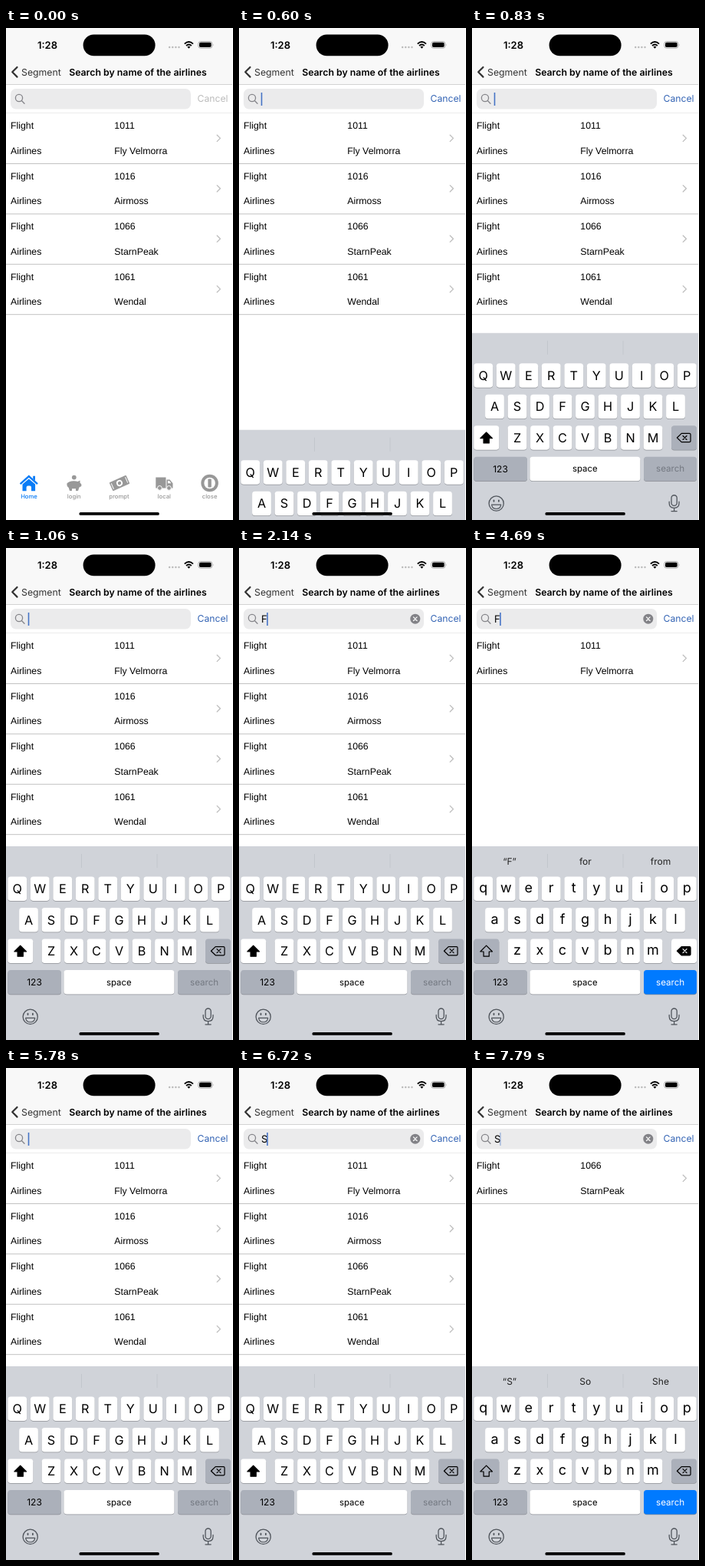
These frames come from a looping animation (296 by 640 pixels, 8 s). An HTML page:

```html
<!DOCTYPE html>
<html lang="en">
<head>
<meta charset="utf-8">
<title>Airline search</title>
<style>
  html, body { margin: 0; width: 100%; height: 100%; overflow: hidden; background: #fff; }
  svg { display: block; font: 12.2px Inter, sans-serif; text-rendering: geometricPrecision; }
  .mid { text-anchor: middle; }
  .row { font: 12.3px "Liberation Sans", Arial, sans-serif; }
  .line { fill: none; stroke-linecap: round; stroke-linejoin: round; }
  .tab text { font-size: 7.7px; font-weight: 500; text-anchor: middle; stroke: none; }
</style>
</head>
<body>
<svg width="295" height="640" viewBox="0 0 295 640">
  <rect width="295" height="73" fill="#f8f8f8"/>
  <path d="M0 73.5H295" stroke="#d2d2d2"/>
  <path d="M0 110.5H295" stroke="#ececec"/>

  <text x="54" y="26.5" class="mid" font-size="13" font-weight="600">1:28</text>
  <rect x="100.6" y="8.4" width="94" height="27.8" rx="13.9"/>
  <path d="M213.2 25H226" stroke="#b9b9b9" stroke-width="2.4" stroke-linecap="round" stroke-dasharray="0 4.1"/>
  <path d="M232.8 20.6Q238.4 15.6 244 20.6M235 23Q238.4 20 241.8 23" fill="none" stroke="#000" stroke-width="1.9"/>
  <path d="M236.4 24.6Q238.4 23 240.4 24.6L238.4 26.8Z"/>
  <rect x="250.8" y="17.6" width="18" height="8.6" rx="2.8" fill="none" stroke="#999" stroke-width=".8"/>
  <rect x="252" y="18.8" width="15.6" height="6.2" rx="1.7"/>
  <path d="M269.8 20.4q1.4 1.5 0 3z" fill="#999"/>

  <path class="line" d="M14.5 51L8.2 57.3L14.5 63.6" stroke="#333" stroke-width="2.2"/>
  <text x="20" y="61.7" font-size="12.3" fill="#333">Segment</text>
  <text x="172" y="61.7" class="mid" font-size="12.3" font-weight="600">Search by name of the airlines</text>

  <rect x="6" y="79" width="235" height="26.5" rx="7" fill="#ebebec"/>
  <g class="line" stroke="#85858a" stroke-width="1.3">
    <circle cx="17" cy="91" r="4.6"/><path d="M20.4 94.5L24 98.2"/>
  </g>
  <text id="query" x="29" y="96.8" font-size="13"></text>
  <rect id="caret" y="84" width="1.6" height="17" fill="#4673c5"/>
  <g id="clear">
    <circle cx="229.8" cy="92.2" r="6.5" fill="#828287"/>
    <path class="line" d="M227.5 89.9l4.6 4.6m0-4.6l-4.6 4.6" stroke="#fff" stroke-width="1.2"/>
  </g>
  <text id="cancel" x="249.6" y="96.2">Cancel</text>

  <g id="list"></g>

  <g class="tab" fill="#989898">
    <g fill="#0a7cf6">
      <path d="M17.8 592.2L29.8 581.5L41.8 592.2L40.2 594L29.8 584.8L19.4 594Z"/>
      <path d="M35.2 582.8H38V589L35.2 586.4Z"/>
      <path d="M21.5 593.6L29.8 586.4L38.1 593.6V602.3H33V597.5Q33 595.5 31 595.5H28.6Q26.6 595.5 26.6 597.5V602.3H21.5Z"/>
      <text x="30" y="611.5" font-weight="700">Home</text>
    </g>
    <circle cx="88.8" cy="584.6" r="2.9"/>
    <path d="M79.3 592.8Q82 589 88.8 589.2Q92 589.2 93.5 590L96.5 588.6V591.4L98.3 593.5V596L95.5 597.4L94 602H91V599.2H86V602H83L81.7 598Q79 596 79.3 592.8Z"/>
    <text x="88.8" y="611.5">login</text>
    <g transform="rotate(-24 148 592)">
      <rect x="136" y="586" width="24" height="12" rx="1"/>
      <circle cx="148" cy="592" r="4" fill="#fff"/><circle cx="148" cy="592" r="2.2"/>
      <path d="M138 588v8m20-8v8" stroke="#fff" stroke-width="1"/>
    </g>
    <text x="147.5" y="611.5">prompt</text>
    <path d="M195.3 584.5H208.5V598.4H195.3ZM209.5 587.6H213.6L217.5 592.2V598.4H209.5Z"/>
    <path d="M211 589H213L215.4 592.2H211Z" fill="#fff"/>
    <g stroke="#fff"><circle cx="200.4" cy="598.4" r="2.9"/><circle cx="212.5" cy="598.4" r="2.9"/></g>
    <text x="206.3" y="611.5">local</text>
    <circle cx="265.6" cy="592" r="11.3"/>
    <circle cx="265.6" cy="592" r="7.3" fill="#fff"/>
    <rect x="263.4" y="586.6" width="4.4" height="10.8" rx="1"/>
    <text x="265.6" y="611.5">close</text>
  </g>

  <g id="keyboard">
    <rect y="388" width="295" height="252" fill="#d0d3d9"/>
    <path d="M98.5 398V416M197 398V416" stroke="#c2c6cc"/>
    <g id="hints" class="mid" font-size="12" fill="#222"></g>
    <g id="keys"></g>
    <path id="shiftIcon" d="M18.7 517.2L26.5 525H22.3V531.2H15.1V525H10.9Z" stroke="#000" stroke-width="1.2" stroke-linejoin="round"/>
    <g class="line" stroke-width="1.2">
      <path id="deleteBody" d="M273.2 518.6H283.5Q285 518.6 285 520V528.4Q285 529.8 283.5 529.8H273.2L267.4 524.2Z" stroke="#000"/>
      <path id="deleteX" d="M275 521.7l5 5m0-5l-5 5"/>
    </g>
    <g class="mid">
      <text x="37" y="569" font-size="12">123</text>
      <text x="147.3" y="568.5" font-size="11.4">space</text>
      <text id="searchText" x="258.6" y="568.5" font-size="11.6">search</text>
    </g>
    <g class="line" stroke="#50555c" stroke-width="1.3">
      <circle cx="31.7" cy="609.8" r="9.6"/>
      <path d="M25.6 611.4H37.8Q37 616.8 31.7 616.8Q26.4 616.8 25.6 611.4Z" stroke-width="1.1"/>
      <path d="M28.5 605.6v1.4m6.4-1.4v1.4" stroke-width="1.8"/>
      <rect x="260" y="599" width="7.2" height="13.6" rx="3.6"/>
      <path d="M257.2 607.5V609.5Q257.2 615.6 263.6 615.6Q270 615.6 270 609.5V607.5M263.6 615.6V619.6M260 619.8H267.2"/>
    </g>
  </g>
  <rect x="95.4" y="630" width="104.5" height="3.8" rx="1.9"/>
</svg>
<script>
const $ = id => document.getElementById(id);
const NS = "http://www.w3.org/2000/svg";
const LOOP = 8000;
const GREY = "#abb0ba";

function add(parent, tag, attrs, text = "") {
  const el = document.createElementNS(NS, tag);
  set(el, attrs);
  el.textContent = text;
  return parent.appendChild(el);
}
function set(el, attrs) {
  for (const k in attrs) el.setAttribute(k, attrs[k]);
}
const show = (el, on) => { el.style.display = on ? "" : "none"; };

// Result list
const flights = [
  ["1011", "Fly Velmorra"], ["1016", "Airmoss"],
  ["1066", "StarnPeak"], ["1061", "Wendal"]
];
const rows = flights.map(([number, name]) => {
  const g = add($("list"), "g", { class: "row" });
  [["Flight", number, 131.4], ["Airlines", name, 163.8]].forEach(([label, value, y]) => {
    add(g, "text", { x: 6, y }, label);
    add(g, "text", { x: 141.3, y }, value);
  });
  add(g, "path", { class: "line", d: "M275.2 139.2L279.4 143.4L275.2 147.6", stroke: "#bdbdbd", "stroke-width": 1.3 });
  add(g, "path", { d: "M0 176.5H295", stroke: "#c2c2c2" });
  return g;
});

// Keyboard
const PITCH = 29.5, ROW = 40.5, TOP = 427.6;
function key(x, row, w, fill) {
  const box = { x, y: TOP + row * ROW, width: w, height: 31.4, rx: 3.8 };
  add($("keys"), "rect", { ...box, y: box.y + .8, fill: "#8e9197" });
  return add($("keys"), "rect", { ...box, fill });
}
const letters = [];
["QWERTYUIOP", "ASDFGHJKL", "ZXCVBNM"].forEach((word, row) => {
  [...word].forEach((char, i) => {
    const x = 147.5 + (i - (word.length - 1) / 2) * PITCH;
    key(x - 12.4, row, 24.8, "#fff");
    letters.push({ char, y: TOP + row * ROW, el: add($("keys"), "text", { x, class: "mid" }) });
  });
});
const shiftKey = key(2.3, 2, 33, GREY);
const deleteKey = key(260, 2, 33, GREY);
key(2.3, 3, 69.7, GREY);
key(75.4, 3, 144, "#fff");
const searchKey = key(224, 3, 69, GREY);
const hints = [49, 147.8, 246].map(x => add($("hints"), "text", { x, y: 411.5 }));

// Each track is [start time, value], held until the next entry
const at = (track, t) => track.reduce((v, [time, value]) => t >= time ? value : v, track[0][1]);

const query = [[0, ""], [2140, "F"], [4800, ""], [6610, "S"]];
const lower = [[0, false], [2260, true], [4800, false], [6730, true]];
const filter = [[0, ""], [2500, "F"], [4910, ""], [6970, "S"]];
const words = [[0, []], [3010, ["“F”", "for", "from"]], [4800, []], [7310, ["“S”", "So", "She"]]];
const caret = [
  [0, 0], [500, 1], [1330, .7], [1450, .4], [1990, 1], [3010, .7], [3130, .4],
  [3670, .7], [3780, 1], [4020, .7], [4140, .4], [4690, 1], [5460, .4], [5780, 1],
  [6320, .7], [6440, .4], [6610, 1], [7670, .7], [7790, .4]
];
const slideSteps = [0, 500, 600, 720, 830, 950, 1060].map(t => [t, t]);

// Critically damped spring
function slide(t) {
  if (t >= 1060) return 0;
  const x = Math.max(0, at(slideSteps, t) - 500) * .0157;
  return 252 * (1 + x) * Math.exp(-x);
}

function draw(t) {
  const text = at(query, t), small = at(lower, t), prefix = at(filter, t);
  const deleting = t >= 4690 && t < 5010;

  $("query").textContent = text;
  set($("caret"), { x: text ? 36.2 : 28.7, opacity: at(caret, t) });
  show($("clear"), text);
  set($("cancel"), { fill: t < 500 ? "#bcbcbc" : "#3565b5" });

  let n = 0;
  rows.forEach((row, i) => {
    const match = flights[i][1].startsWith(prefix);
    show(row, match);
    if (match) set(row, { transform: `translate(0 ${65.4 * n++})` });
  });

  set($("keyboard"), { transform: `translate(0 ${slide(t)})` });
  letters.forEach(({ char, y, el }) => {
    el.textContent = small ? char.toLowerCase() : char;
    set(el, { y: y + (small ? 20.6 : 21.4), "font-size": small ? 18 : 16.2 });
  });
  hints.forEach((el, i) => { el.textContent = at(words, t)[i] || ""; });

  set(shiftKey, { fill: small ? GREY : "#fff" });
  set($("shiftIcon"), { fill: small ? "none" : "#000" });
  set(deleteKey, { fill: deleting ? "#fff" : GREY });
  set($("deleteBody"), { fill: deleting ? "#000" : "none" });
  set($("deleteX"), { stroke: deleting ? "#fff" : "#000" });
  set(searchKey, { fill: small ? "#007aff" : GREY });
  set($("searchText"), { fill: small ? "#fff" : "#747982" });
}

const start = performance.now();
function frame() {
  draw((performance.now() - start) % LOOP);
  requestAnimationFrame(frame);
}
frame();
</script>
</body>
</html>
```
